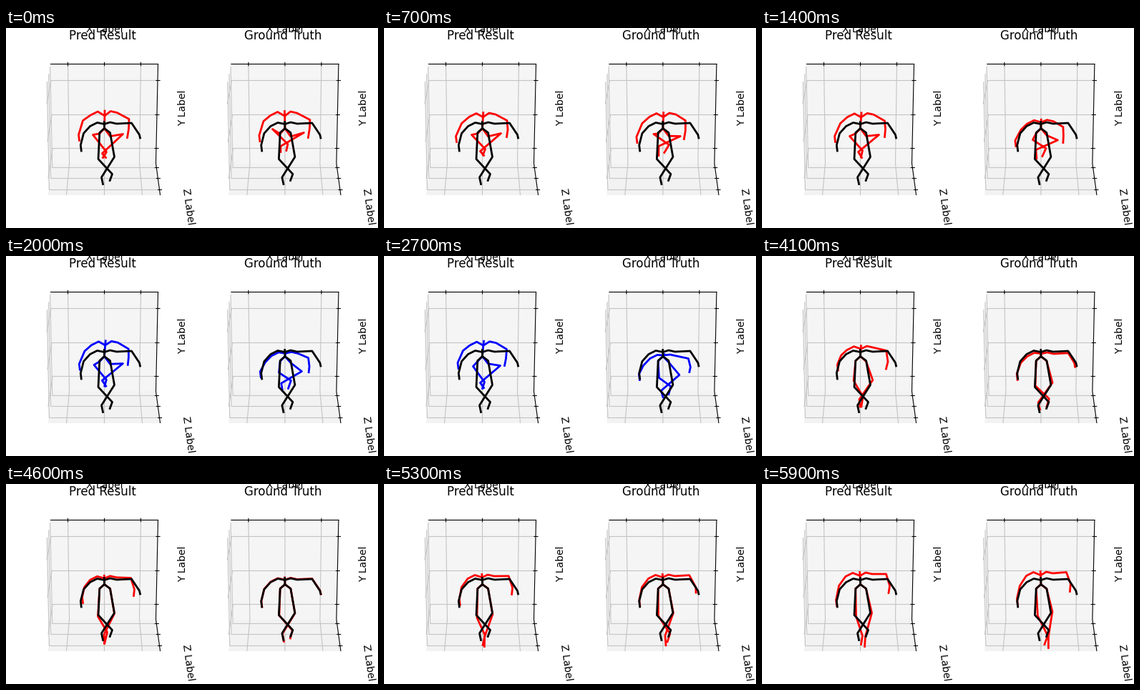
Animation of 520x280 px, one loop 6000 ms. Source, as a matplotlib script:

```python
import numpy as np
import matplotlib.pyplot as plt
from matplotlib.animation import FuncAnimation

W, H, DPI = 520, 280, 100
FRAMES, STEP_MS = 60, 100
PANEL_GAP = 252.4
BLUE_SPAN = range(20, 40)
GRID = dict(color="#c4c4c4", lw=0.8, zorder=2)
AXIS = dict(color="black", lw=0.8, zorder=3)
BONE = dict(lw=2, solid_joinstyle="round", solid_capstyle="projecting")

plt.rcParams["font.family"] = "DejaVu Sans"

# Keyed by frame: girdle shift, left elbow, left hand, right elbow, wrist, hand
PRED_ARMS = {
    0: (0.7, -15.5, 107, 129, 102, 157, 171.5, 127, 171, 141, 169, 153),
    7: (1.5, -13, 108, 133, 101, 159, 171.5, 129, 172.5, 142, 171, 152),
    14: (1.7, -12.7, 109, 133, 102, 159, 171, 129.5, 172, 141, 171, 152),
    27: (2.2, -12.3, 110, 132, 103.5, 157, 171, 130, 170, 143, 168, 153),
    35: (2.3, -10, 111, 132, 104, 153, 172, 132, 171, 147, 167, 158),
    46: (0, -3.2, 109, 144, 107, 166, 174, 131, 179, 147, 178, 156),
    59: (-0.7, -8, 107, 142, 104, 170, 173, 125.5, 178, 142, 176.5, 152),
}
TRUE_ARMS = {
    0: (-0.3, -15, 107, 130, 102, 158, 172, 128, 171.5, 140, 169.5, 153),
    7: (1, -13, 108, 133, 101, 160, 168.5, 129, 168.5, 143, 166.5, 155),
    14: (0.5, -3.3, 109, 142, 102, 165, 168, 138, 168.5, 150, 168, 160),
    27: (2, 6, 109.5, 153, 104.5, 173, 172.5, 143, 175.5, 155, 174, 162),
    35: (2, 6.2, 109.5, 152, 103.5, 174, 174.5, 139, 179.5, 150, 179.5, 157),
    46: (0, -0.6, 108, 146.5, 105, 171.5, 175, 132, 186, 148.5, 187.3, 153.5),
    59: (-0.5, -9, 107.5, 142, 104.5, 168, 172.5, 123, 178.5, 139, 177.5, 150),
}
# Left knee, ankle, foot, then right knee, ankle, foot
PRED_LEGS = {
    0: (121, 149, 140, 173, 135, 181, 163, 148, 134, 175, 139, 181),
    7: (122, 149, 141, 169, 138, 177, 163, 147, 134, 172, 139, 178),
    14: (122, 151, 140, 171, 138, 180, 163, 149, 134, 173, 139, 181),
    27: (124, 154, 140, 176, 137, 185, 162, 153, 134, 177, 139, 184),
    35: (127, 160, 140, 183, 139, 195, 159, 162, 135, 187, 137, 194),
    46: (128, 185, 141, 207, 137.5, 222, 151, 181, 136.5, 210, 137, 223),
    59: (131, 185, 140, 212, 138, 224, 153, 180, 144, 213, 143, 227),
}
TRUE_LEGS = {
    0: (119.5, 141, 141, 162, 139, 171, 163.5, 146, 131, 165, 131, 173),
    7: (124, 148, 145.5, 163, 139, 174, 161.5, 151, 131, 165, 131, 178),
    14: (125.5, 156, 144, 168, 139, 179, 160.5, 156.5, 130, 170, 131, 182),
    27: (131.5, 170, 148, 182, 145, 193, 160, 166, 134.5, 188, 137, 197),
    35: (130, 177, 149, 192, 145.5, 203, 156.5, 171, 134.5, 198, 137, 206.5),
    46: (129, 183.5, 147.5, 204.5, 144.5, 215.5, 151, 180.5, 133.5, 209, 135.5, 220),
    59: (132.5, 184, 146.5, 212, 142, 224, 153, 178, 147.5, 213, 147.5, 229),
}
REST_ARMS = (0, 0, 108, 147, 104.8, 171.5, 175, 132.5, 186, 149, 187, 153.5)
REST_LEGS = (128.5, 183, 148, 204, 144.7, 213, 151, 180, 133, 208.5, 135, 218)


def track(keys, frame):
    """Smooth cubic interpolation through keyed poses."""
    times = np.array(list(keys), float)
    poses = np.array(list(keys.values()), float)
    slopes = np.gradient(poses, times, axis=0)
    i = int(np.clip(np.searchsorted(times, frame, side="right") - 1, 0, len(times) - 2))
    span = times[i + 1] - times[i]
    u = (frame - times[i]) / span
    return ((1 + 2 * u) * (1 - u) ** 2 * poses[i]
            + u * (1 - u) ** 2 * span * slopes[i]
            + u * u * (3 - 2 * u) * poses[i + 1]
            + u * u * (u - 1) * span * slopes[i + 1])


def skeleton(arms, legs):
    """Three polylines: both arms, spine, both legs."""
    (dx, dy), elbow_l, hand_l, *arm_r = np.reshape(arms, (6, 2))
    leg_l, leg_r = np.reshape(legs, (2, 3, 2))
    shift = np.array([dx, dy])
    neck = np.array([137 + dx * 0.6, 134 + dy * 0.75])
    pelvis = (137, 140)
    hip_l = (130.3, 146 + 0.04 * (183 - leg_l[0][1]))
    hip_r = (145, 146 + 0.16 * (180 - leg_r[0][1]))
    arm_line = [hand_l, hand_l - (1, 8), elbow_l,
                shift + (117, 137), shift + (127, 132), neck,
                shift + (145, 131.5), shift + (154, 133.5), *arm_r]
    spine = [shift + (136.8, 131), neck, pelvis]
    leg_line = [*leg_l[::-1], hip_l, pelvis, hip_r, *leg_r]
    return [np.array(p) for p in (arm_line, spine, leg_line)]


fig = plt.figure(figsize=(W / DPI, H / DPI), dpi=DPI, facecolor="white")
ax = fig.add_axes([0, 0, 1, 1])
ax.set_xlim(-0.5, W - 0.5)
ax.set_ylim(H - 0.5, -0.5)
ax.axis("off")


def mix(a, b, t):
    return np.add(a, np.subtract(b, a) * t)


def draw_room(x0, title):
    def path(points, **style):
        pts = np.array(points, float)
        ax.plot(pts[:, 0] + x0, pts[:, 1], snap=False, **style)

    def pane(points, grey):
        pts = np.array(points, float) + (x0, 0)
        ax.fill(pts[:, 0], pts[:, 1], color=str(grey), lw=0.6, zorder=1)

    def label(x, y, text, angle=0, size=10, va="center"):
        ax.text(x0 + x, y, text, rotation=angle, fontsize=size, ha="center",
                va=va, rotation_mode="anchor" if va == "baseline" else "default")

    far_tl, far_tr, far_bl, far_br = (62, 50), (212, 50), (65, 189), (209, 189)
    near_tl, near_bl, near_br = (56, 80), (59, 233), (215, 233)
    pane([far_tl, far_bl, near_bl, near_tl], 0.975)
    pane([far_bl, far_br, near_br, near_bl], 0.95)
    pane([far_tl, far_tr, far_br, far_bl], 0.9625)

    for k in (-1, 0, 1):
        path([(137 + 51 * k, 50), (137 + 49 * k, 189), (137 + 53 * k, 233)], **GRID)
        path([(137 + 51 * k, 47.8), (137 + 51 * k, 52.2)], **AXIS)
    for y in (73, 121, 168):
        t = (y - 50) / 139
        right = mix(far_tr, far_br, t)
        path([mix(near_tl, near_bl, t), mix(far_tl, far_bl, t), right], **GRID)
        path([right - (2, 0), right + (3, 0)], **AXIS)
    for y in (195, 210, 226):
        t = (y - 189) / 44
        right = mix(far_br, near_br, t)
        path([mix(far_tl, near_tl, t), mix(far_bl, near_bl, t), right], **GRID)
        path([right - (2, 0), right + (3, 0)], **AXIS)
    path([far_tl, far_tr], **AXIS)
    path([far_tr, far_br, near_br], **AXIS)

    label(137, 6, "X Label", va="baseline")
    label(247, 111, "Y Label", 90)
    label(254, 249.5, "Z Label", -82)
    label(134, 16, title, size=12, va="baseline")


def add_bones(color, zorder):
    return [ax.plot([], [], color=color, zorder=zorder, **BONE)[0] for _ in range(3)]


def place(lines, shapes, x0):
    for line, pts in zip(lines, shapes):
        line.set_data(pts[:, 0] + x0, pts[:, 1])


panels = []
for x0, title, arms, legs in ((0, "Pred Result", PRED_ARMS, PRED_LEGS),
                              (PANEL_GAP, "Ground Truth", TRUE_ARMS, TRUE_LEGS)):
    draw_room(x0, title)
    panels.append((x0, arms, legs, add_bones("red", 4)))
    place(add_bones("black", 5), skeleton(REST_ARMS, REST_LEGS), x0)


def update(frame):
    color = "blue" if frame in BLUE_SPAN else "red"
    moved = []
    for x0, arms, legs, lines in panels:
        place(lines, skeleton(track(arms, frame), track(legs, frame)), x0)
        for line in lines:
            line.set_color(color)
        moved += lines
    return moved


anim = FuncAnimation(fig, update, frames=FRAMES, interval=STEP_MS,
                     init_func=lambda: update(0), repeat=True, repeat_delay=0)
plt.show()
```
